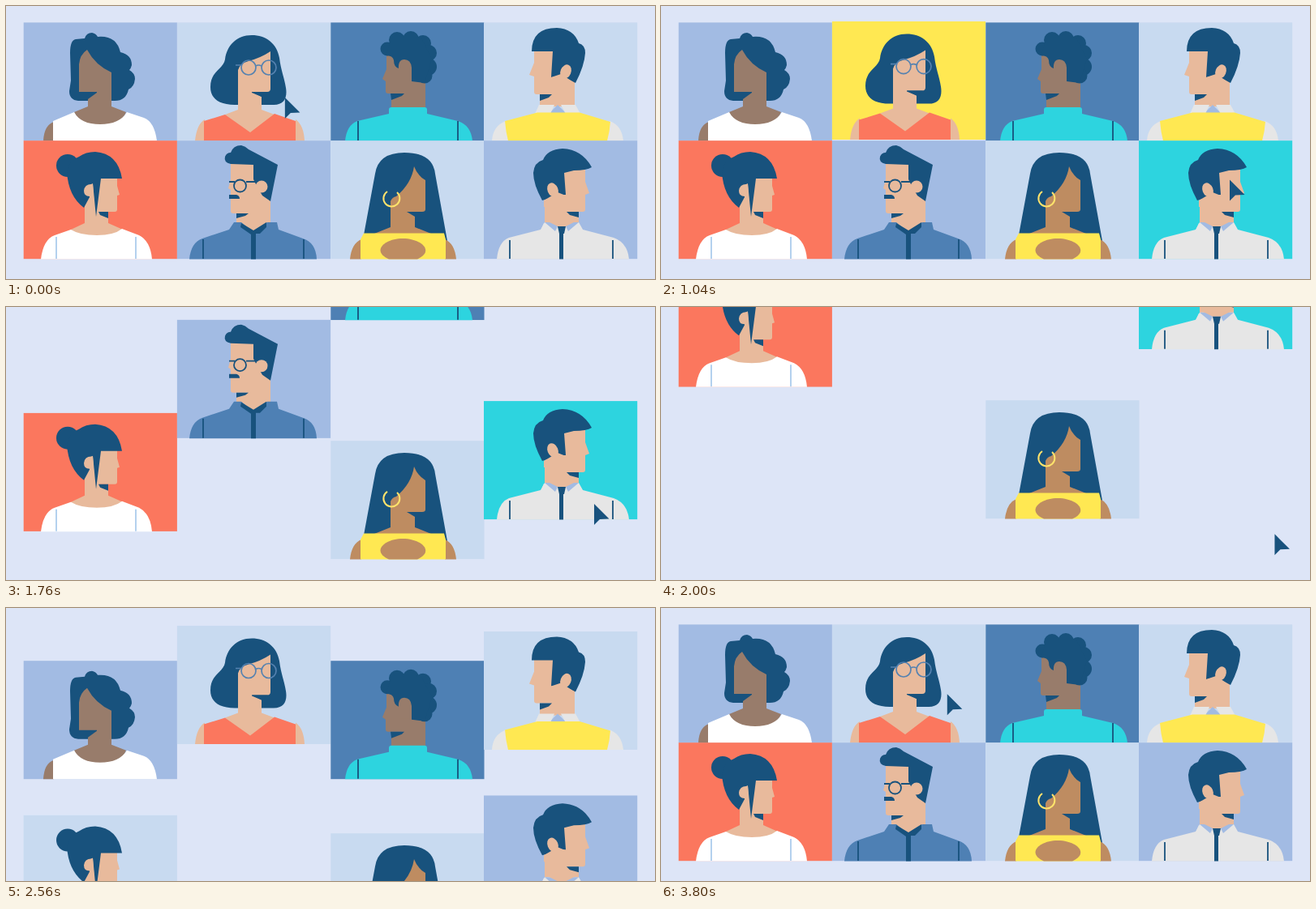
An HTML page without scripts for the animation above (3840 ms loop, 800 by 337 pixels).

```html
<!DOCTYPE html>
<html lang="en">
<head>
<meta charset="utf-8">
<title>Portrait wall</title>
<style>
html, body { margin: 0; height: 100%; overflow: hidden; background: #dde5f7; }
svg { display: block; width: 100%; height: 100%; }

.navy { fill: #18527d; }
.steel { fill: #4e80b4; }
.blue { fill: #a2bbe3; }
.pale { fill: #c8daf0; }
.red { fill: #fb775e; }
.yellow { fill: #ffe852; }
.teal { fill: #2dd4df; }
.white { fill: #fff; }
.grey { fill: #e6e6e6; }
.fair { fill: #e8ba9c; }
.brown { fill: #987c6b; }
.tan { fill: #be8c61; }
.line { fill: none; stroke: #18527d; stroke-width: 1.8; }

/* Tiles speed up on the way out and slow down on the way in. */
.tile { animation: 3.84s cubic-bezier(.333, 0, .667, 0) infinite; }
@keyframes tile1 {
  0%, 28.36% { translate: 0 0; }
  44.48% { translate: 0 -337px; animation-timing-function: step-end; }
  58.8% { translate: 0 337px; animation-timing-function: cubic-bezier(.333, 1, .667, 1); }
  74.92%, 100% { translate: 0 0; }
}
@keyframes tile2 {
  0%, 24.53% { translate: 0 0; }
  40.65% { translate: 0 -337px; animation-timing-function: step-end; }
  53.23% { translate: 0 337px; animation-timing-function: cubic-bezier(.333, 1, .667, 1); }
  69.35%, 100% { translate: 0 0; }
}
@keyframes tile3 {
  0%, 33.54% { translate: 0 0; }
  49.66% { translate: 0 -337px; animation-timing-function: step-end; }
  58.8% { translate: 0 337px; animation-timing-function: cubic-bezier(.333, 1, .667, 1); }
  74.92%, 100% { translate: 0 0; }
}
@keyframes tile4 {
  0%, 30.29% { translate: 0 0; }
  46.41% { translate: 0 -337px; animation-timing-function: step-end; }
  55.31% { translate: 0 337px; animation-timing-function: cubic-bezier(.333, 1, .667, 1); }
  71.43%, 100% { translate: 0 0; }
}
@keyframes tile5 {
  0%, 38.26% { translate: 0 0; }
  54.38% { translate: 0 -337px; animation-timing-function: step-end; }
  60.94% { translate: 0 337px; animation-timing-function: cubic-bezier(.333, 1, .667, 1); }
  77.06%, 100% { translate: 0 0; }
}
@keyframes tile6 {
  0%, 33.54% { translate: 0 0; }
  49.66% { translate: 0 -337px; animation-timing-function: step-end; }
  65.52% { translate: 0 337px; animation-timing-function: cubic-bezier(.333, 1, .667, 1); }
  81.64%, 100% { translate: 0 0; }
}
@keyframes tile7 {
  0%, 43.52% { translate: 0 0; }
  59.64% { translate: 0 -337px; animation-timing-function: step-end; }
  61.74% { translate: 0 337px; animation-timing-function: cubic-bezier(.333, 1, .667, 1); }
  77.86%, 100% { translate: 0 0; }
}
@keyframes tile8 {
  0%, 37.32% { translate: 0 0; }
  53.44% { translate: 0 -337px; animation-timing-function: step-end; }
  59.9% { translate: 0 337px; animation-timing-function: cubic-bezier(.333, 1, .667, 1); }
  76.02%, 100% { translate: 0 0; }
}

/* Clicked tiles switch colour at once. */
.pick { animation: 3.84s step-end infinite; }
@keyframes pickYellow { 5.5% { fill: #ffe852; } 45%, 100% { fill: #c8daf0; } }
@keyframes pickTeal { 17.5% { fill: #2dd4df; } 56%, 100% { fill: #a2bbe3; } }
@keyframes pickRed { 0% { fill: #fb775e; } 57% { fill: #c8daf0; } 89.3%, 100% { fill: #fb775e; } }

.cursor { animation: cursor 3.84s linear infinite; }
@keyframes cursor {
  0% { translate: 344px 113px; animation-timing-function: ease-out; }
  3.5%, 5.7% { translate: 332px 122px; animation-timing-function: cubic-bezier(.4, 0, .75, .6); }
  12.5% { translate: 619px 188px; animation-timing-function: cubic-bezier(.3, .4, .5, 1); }
  17%, 33.85% { translate: 701px 214.5px; animation-timing-function: cubic-bezier(.333, 0, .667, .333); }
  58.85% { translate: 805px 338px; animation-timing-function: step-end; }
  80% { translate: 118px 340px; animation-timing-function: ease-out; }
  86.5%, 89.8% { translate: 118px 262px; animation-timing-function: ease-in-out; }
  98.96% { translate: 353px 106px; }
  100% { translate: 344px 113px; }
}
</style>
</head>
<body>
<svg viewBox="0 0 800 337" preserveAspectRatio="none">
  <defs><rect id="card" width="189.200" height="146"/></defs>

  <g class="tile" style="animation-name: tile1">
    <use href="#card" x="21.700" y="20.400" class="blue"/>
    <path class="navy" d="M79 58Q79 42 86 41L97 40Q99 33 106 33Q111 34 113 38Q136 36 141 57Q155 60 155 73Q154 77 152 79Q159 83 159 90Q158 100 151 103Q148 117 134 117H89Q78 116 78 105L80 92Z"/>
    <path class="brown" d="M90 106V72Q91 60 100 54Q110 73 130 82V124L148 131Q142 147 116 147T84 131L101 124V115L112 107V106Z"/>
    <path class="brown" d="M46 166.500Q47 147 59 143V166.500Z"/>
    <path class="white" d="M58 142L84 131Q92 146 116 146T149 131L170 138Q183 143 186 166.500H58Z"/>
  </g>

  <g class="tile" style="animation-name: tile2">
    <use href="#card" x="210.900" y="20.400" class="pale pick" style="animation-name: pickYellow"/>
    <path class="navy" d="M303 36C284 36 272 49 270 66C268 78 252 80 252 100C252 114 262 122 282 122H330C343 122 347 113 345 101C343 88 339 80 337 64C334 46 320 36 303 36Z"/>
    <path class="fair" d="M286 79Q288 71 299 68Q314 64 326 56V102Q326 106 322 106H303V107L315 112V128L331 134L301 157L270 134L286 128Z"/>
    <path class="navy" d="M303 106H323L315 112Z"/>
    <path class="fair" d="M233 166.500Q235 146 245 140V166.500ZM357 140Q367 147 368 166.500H357Z"/>
    <path class="red" d="M244 166.500V142L270 134L301 156L331 133L357 142V166.500Z"/>
    <g fill="none" stroke="#5582b0" stroke-width="1.700">
      <circle cx="299" cy="76" r="9"/>
      <circle cx="324" cy="76" r="9"/>
      <path d="M283 73H290M308 74Q311 72 315 74"/>
    </g>
  </g>

  <g class="tile" style="animation-name: tile3">
    <use href="#card" x="400.300" y="20.400" class="steel"/>
    <path class="brown" d="M469 60H517V126H475V113L488 108H471Q468 108 468 105V93L464 90L469 78Z"/>
    <path class="navy" d="M474 108H491L488 111L475 116Z"/>
    <g class="navy">
      <circle cx="470" cy="53" r="8.500"/>
      <circle cx="482" cy="42" r="10"/>
      <circle cx="499" cy="41" r="10"/>
      <circle cx="514" cy="46" r="10"/>
      <circle cx="521" cy="58" r="10"/>
      <circle cx="520" cy="75" r="11"/>
      <circle cx="516" cy="86" r="9.500"/>
      <path d="M468 61Q477 61 478 67Q478 75 484 77L500 87V93L516 95L525 65L512 40H475Z"/>
    </g>
    <path class="brown" d="M484 78Q483 66 491 66Q499 66 500 76V92H484Z"/>
    <path class="teal" d="M418 166.500Q420 147 433 142L472 133V128Q472 125 475 125H516Q519 125 519 128V133L557 142Q573 147 575 166.500Z"/>
    <path class="line" d="M434 142V166M557 142V166"/>
  </g>

  <g class="tile" style="animation-name: tile4">
    <use href="#card" x="589" y="20.400" class="pale"/>
    <path class="fair" d="M651 54H701V124H658V113L672 109H654Q651 109 651 106V87L645 85L651 70Z"/>
    <path class="navy" d="M648 56Q648 27 679 27Q700 28 706 46Q714 48 714 58Q713 74 702 95L694 91L683 85L679 87L672 88L674 56Z"/>
    <ellipse class="fair" cx="690" cy="81" rx="6.500" ry="9" transform="rotate(22 690 81)"/>
    <path class="fair" d="M672 88L684 84L701 95V102H672Z"/>
    <path class="navy" d="M658 109H673L669 113L658 117Z"/>
    <path class="blue" d="M680 122L670 132H690Z"/>
    <path class="grey" d="M657 122L652 133H671L676 122ZM684 122L690 133H708L702 122ZM599 166.500Q600 148 616 142L621 166.500ZM744 142Q759 147 761 166.500H739Z"/>
    <path class="yellow" d="M615 142L655 131.500H707L745 143Q744 156 741 166.500H619Q616 155 615 142Z"/>
  </g>

  <g class="tile" style="animation-name: tile5">
    <use href="#card" x="21.700" y="166.200" class="red pick" style="animation-name: pickRed"/>
    <circle class="navy" cx="76" cy="197" r="14"/>
    <path class="fair" d="M97 208H137V222L140 233L137 234V251Q137 254 134 254H115L126 258V268L144 276Q136 284 112 284T80 276L97 268Z"/>
    <path class="navy" d="M75 205Q78 190 90 186Q98 180 110 180Q138 182 143 213H117L111 260L107 219L103 221V236L96 249Q77 235 75 205Z"/>
    <path class="fair" d="M107 220Q97 219 96 228Q96 235 103 235V248H109Z"/>
    <path class="navy" d="M114 254H126V262L116 258Z"/>
    <path class="white" d="M43 312.500Q46 288 60 283L80 276Q91 283 112 283T143 275L164 283Q178 290 180 312.500Z"/>
    <path d="M62 285V312M160 285V312" stroke="#a2c6ea" stroke-width="1.600"/>
  </g>

  <g class="tile" style="animation-name: tile6">
    <use href="#card" x="210.900" y="166.200" class="blue"/>
    <path class="fair" d="M277 194H326V270L305 280L284 270V260L298 256H280Q277 256 277 253V227L274 225L277 214Z"/>
    <path class="navy" d="M277 195Q268 193 270 186Q272 181 277 181Q280 172 290 172Q295 173 299 177L335 196L326 241L316 234L309 222L305 214V196Z"/>
    <circle class="fair" cx="315" cy="223" r="7.500"/>
    <path class="navy" d="M275 238V233H284Q288 234 288 238ZM284 256H299L295 259L284 262Z"/>
    <path class="line" d="M275 217H282M296 217H309"/>
    <circle class="line" cx="288.500" cy="222" r="7.500"/>
    <path class="steel" d="M226 312.500Q228 292 242 287L275 276L281 267H290L305 279L322 267H334L336 276L366 287Q382 292 383 312.500Z"/>
    <path class="navy" d="M290 268L305 277L321 267V273L313 281H308V312.500H302V282L289 273Z"/>
    <path class="line" d="M243 288V312M367 288V312"/>
  </g>

  <g class="tile" style="animation-name: tile7">
    <use href="#card" x="400.300" y="166.200" class="pale"/>
    <path class="navy" d="M440 288L455 207Q459 181 491 181Q526 181 529 207L544 290Z"/>
    <path class="tan" d="M474 241Q476 236 481 235Q500 219 503 198Q507 209 517 215V251Q517 254 513 254H494L504 260V273L524 281H454L474 273Z"/>
    <path class="tan" d="M424 312.500Q426 293 438 288V312.500ZM541 288Q553 293 555 312.500H541Z"/>
    <path class="yellow" d="M437 312.500V288L441 280.500H540L542 288V312.500Z"/>
    <path class="tan" d="M472 312.500C450 303 466 287 489 287S529 303 507 312.500Z"/>
    <path d="M470 229A10 10 0 1 0 482 230" fill="none" stroke="#ffe36b" stroke-width="2"/>
  </g>

  <g class="tile" style="animation-name: tile8">
    <use href="#card" x="589" y="166.200" class="blue pick" style="animation-name: pickTeal"/>
    <path class="fair" d="M664 200H714V217L719 231L714 233V251Q714 254 711 254H692L706 258V270H664Z"/>
    <path class="navy" d="M661 240Q650 220 650 206Q651 193 662 190Q667 177 686 176Q710 177 722 199Q716 203 700 203L688 206L690 233H680L671 237Z"/>
    <ellipse class="fair" cx="674" cy="227" rx="6.500" ry="9" transform="rotate(-22 674 227)"/>
    <path class="fair" d="M690 234L680 230L663 240V248H690Z"/>
    <path class="navy" d="M691 254H706V261L695 258Z"/>
    <path class="grey" d="M605 312.500Q607 291 620 286L659 276L664 267H706L711 276L749 286Q766 292 768 312.500Z"/>
    <path class="blue" d="M664 267L677 278L680 272H690L693 278L706 267Z"/>
    <path class="fair" d="M666 265H704L690 272H680Z"/>
    <path class="grey" d="M663 268L659 277H674ZM706 268L696 277H711Z"/>
    <path class="navy" d="M680 272H690L688 281H687V312.500H682V281Z"/>
    <path class="line" d="M621 289V312M748 289V312"/>
  </g>

  <path class="cursor navy" d="M0 0V26L7 19L18.500 18.500Z"/>
</svg>
</body>
</html>
```
